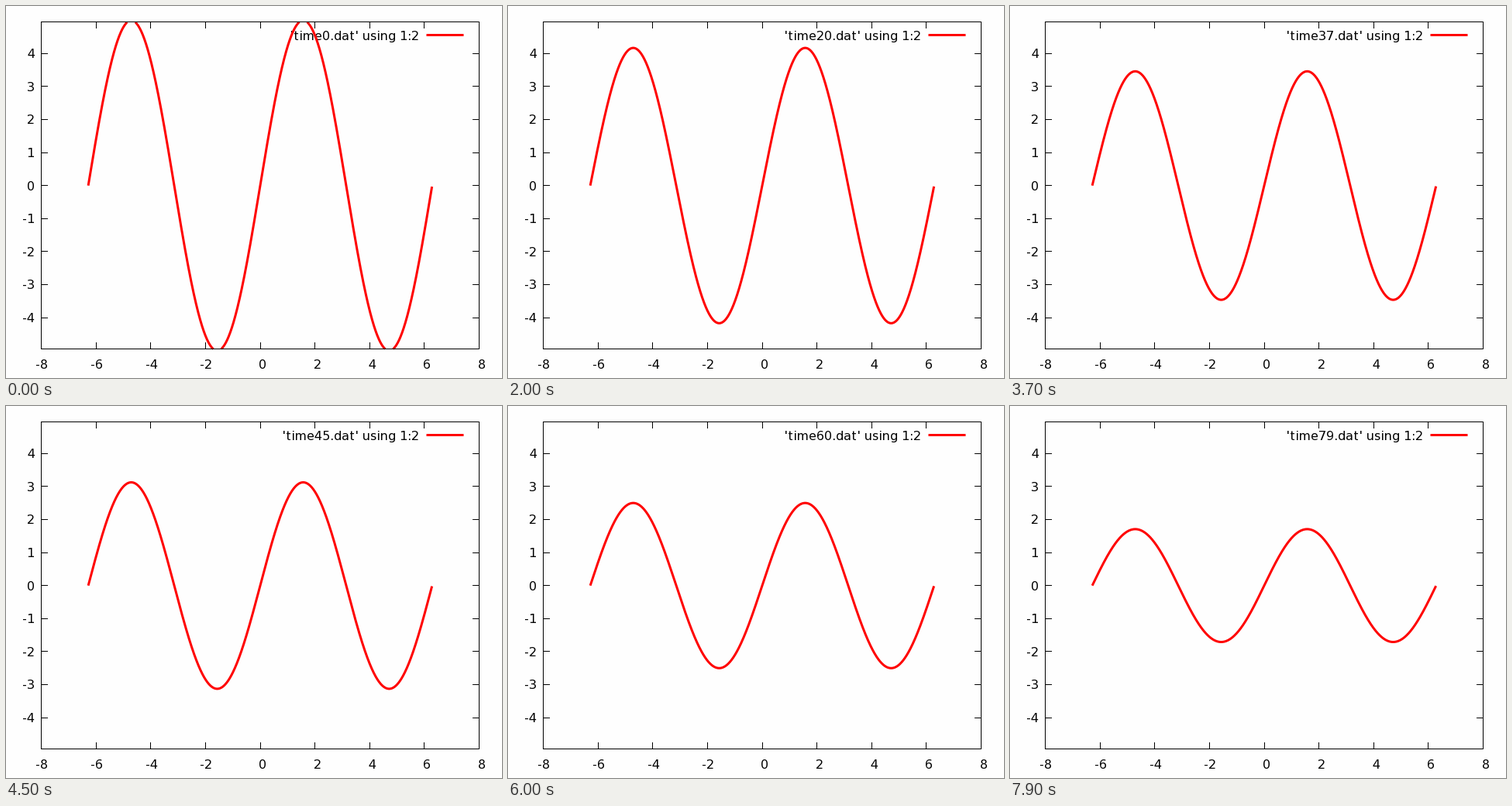
Recreate the animation shown at these times as a matplotlib script. Size 640x480 px, loop 8 s.

```python
import numpy as np
import matplotlib.pyplot as plt
from matplotlib.animation import FuncAnimation

W, H, DPI = 640, 480, 100
FRAMES, INTERVAL = 80, 100
LEFT, RIGHT, TOP, BOTTOM = 45, 610, 20, 442
X_MAX, Y_MAX = 8, 4.95
TICK = 8
DIGIT, MINUS, BLANK = 10, 6, 5  # glyph advances, for aligning the labels
PX = 72 / DPI  # one pixel in points

plt.rcParams["font.family"] = "DejaVu Sans"
plt.rcParams["font.size"] = 16 * PX
plt.rcParams["text.hinting_factor"] = 1  # whole-pixel letter spacing

fig = plt.figure(figsize=(W / DPI, H / DPI), dpi=DPI, facecolor="#fefefe")
ax = fig.add_axes([0, 0, 1, 1])
ax.set_xlim(0, W)
ax.set_ylim(H, 0)
ax.axis("off")


def to_x(v):
    return (LEFT + RIGHT) / 2 + v * (RIGHT - LEFT) / (2 * X_MAX)


def to_y(v):
    return (TOP + BOTTOM) / 2 + 0.2 - v * (BOTTOM - TOP) / (2 * Y_MAX)


def snap(v):
    return np.floor(v + 0.5)


def stroke(xs, ys, color="black", width=1, z=3):
    """Line through pixel centres."""
    cap = "butt" if width > 1 else "projecting"
    return ax.plot(np.asarray(xs) + 0.5, np.asarray(ys) + 0.5, color=color,
                   lw=width * PX, solid_capstyle=cap, solid_joinstyle="round",
                   snap=False, zorder=z)[0]


def label(x, y, text, ha="left"):
    return ax.text(x, y, text, ha=ha, va="baseline", color="black", zorder=1)


stroke([LEFT, RIGHT, RIGHT, LEFT, LEFT], [TOP, TOP, BOTTOM, BOTTOM, TOP])

for v in range(-8, 9, 2):
    x = snap(to_x(v))
    if abs(v) < X_MAX:
        stroke([x, x], [BOTTOM, BOTTOM - TICK])
        stroke([x, x], [TOP, TOP + TICK])
    # non-negative labels carry a leading blank for the sign
    sign = MINUS if v < 0 else BLANK
    start = to_x(v) + 1.4 - (sign + DIGIT) / 2
    label(snap(start if v < 0 else start + BLANK), 468, f"{v}")

for v in range(-4, 5):
    y = snap(to_y(v))
    stroke([LEFT, LEFT + TICK], [y, y])
    stroke([RIGHT, RIGHT - TICK], [y, y])
    label(37 - DIGIT - (MINUS if v < 0 else 0), snap(to_y(v) + 0.3) + 6, f"{v}")

key = label(533, 44, "", "right")
stroke([542, 590], [37, 37], "red", 3, 2)

xs = np.arange(-2 * np.pi, 2 * np.pi, 0.01)
curve = stroke(to_x(xs), to_y(0 * xs), "red", 3, 2)


def update(i):
    ys = 5 * (1 - i / 120) * np.sin(xs)
    ys[np.abs(ys) > Y_MAX] = np.nan
    curve.set_ydata(to_y(ys) + 0.5)
    key.set_text(f"'time{i}.dat' using 1:2")
    return curve, key


anim = FuncAnimation(fig, update, frames=FRAMES, interval=INTERVAL,
                     repeat=True, repeat_delay=0)
plt.show()
```
